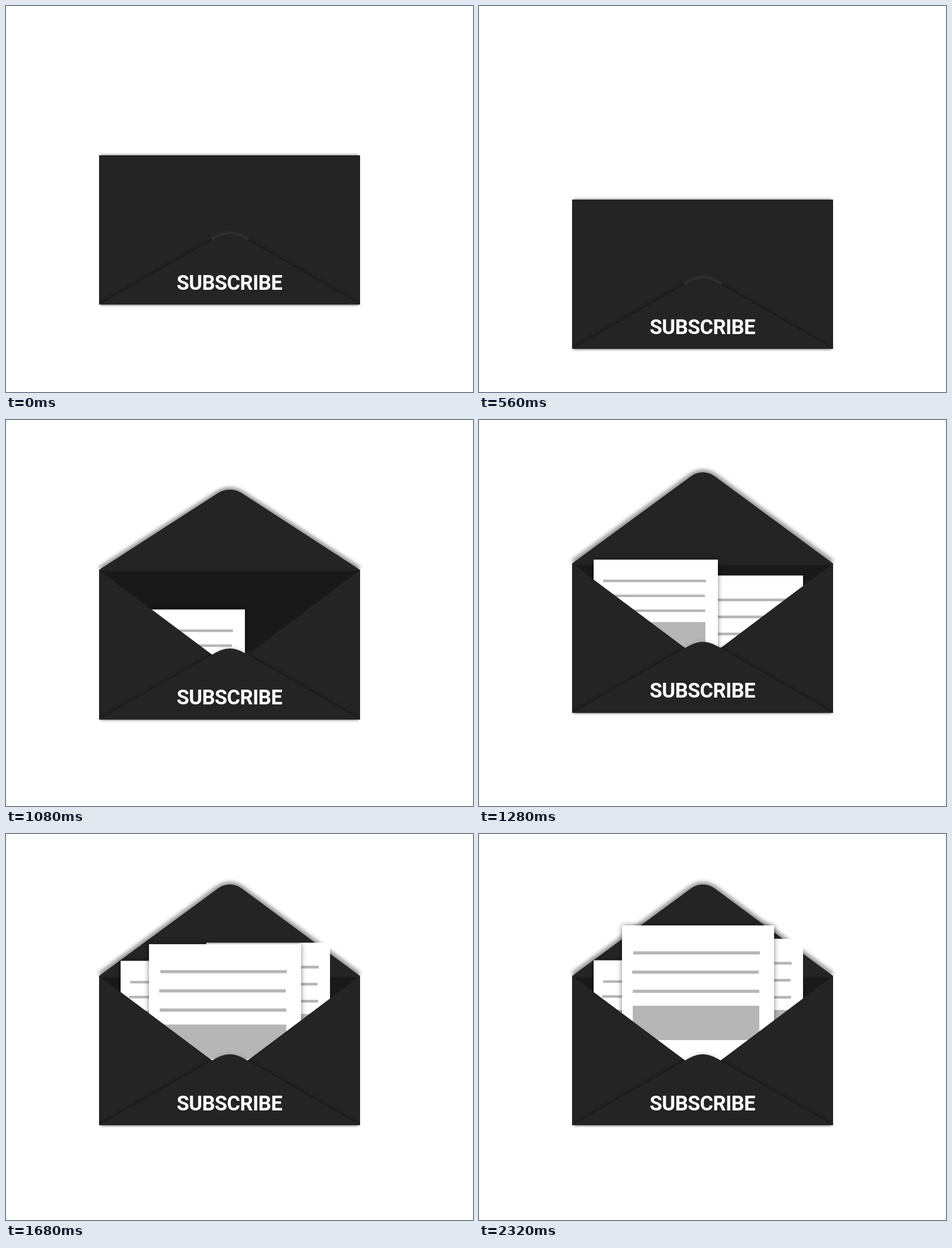
These frames come from a looping animation (823 by 680 pixels, 2960 ms). An HTML page:

```html
<!DOCTYPE html>
<html lang="en">
<head>
<meta charset="utf-8">
<title>Subscribe envelope</title>
<style>
  html, body { margin: 0; width: 100%; height: 100%; overflow: hidden; background: #fff; }
  svg { display: block; width: 100%; height: 100%; }
  .cover { fill: #242424; }
  .edge { fill: none; stroke: #000; }
  .ink { fill: #b6b6b6; }
  .label { font: 700 36px Roboto, Arial, sans-serif; letter-spacing: -.6px; fill: #fff; text-anchor: middle; }
</style>
</head>
<body>
<svg viewBox="0 0 823 680">
  <defs>
    <clipPath id="inside"><rect x="0" y="-300" width="823" height="550"/></clipPath>
    <path id="sides" d="M164 0L364 149.5H425L624 0V263H164Z"/>
    <clipPath id="sideArea"><use href="#sides"/></clipPath>
    <path id="pocket" d="M164 263L364 148.5C376 141.5 385 138 394.5 138S413 141.5 425 148.5L624 263Z"/>
  </defs>
  <g id="envelope">
    <path class="edge" d="M167 263.5H621" stroke-width="3" opacity=".3" style="filter:blur(1px)"/>
    <path id="topShade" class="edge" d="M167 -.5H621" stroke-width="4" opacity=".25" style="filter:blur(1.5px)"/>
    <rect x="164" width="460" height="263" fill="#191919"/>
    <g id="flap">
      <path id="flapShade" class="edge" d="M166 -2L372 -153C380 -159 387 -161 394.5 -161S409 -159 417 -153L622 -2"
        stroke-width="9" opacity=".45" style="filter:blur(3.5px)"/>
      <path class="cover" d="M164 0L372 -153C380 -159 387 -161 394.5 -161S409 -159 417 -153L624 0V2.5H164Z"/>
    </g>
    <g id="papers" clip-path="url(#inside)"></g>
    <use href="#pocket" fill="#777" opacity=".5" style="filter:blur(3px)"/>
    <use href="#sides" class="cover"/>
    <g clip-path="url(#sideArea)">
      <use href="#pocket" opacity=".65" style="filter:blur(3.5px)"/>
    </g>
    <use href="#pocket" class="cover"/>
    <text class="label" x="393.7" y="236.8">SUBSCRIBE</text>
  </g>
</svg>
<script>
const LOOP = 2960, STEP = 40, LAST = 2320, TURN = 640;
const NS = 'http://www.w3.org/2000/svg';
const $ = id => document.getElementById(id);

function add(parent, tag, attrs) {
  const el = document.createElementNS(NS, tag);
  for (const key in attrs) el.setAttribute(key, attrs[key]);
  return parent.appendChild(el);
}

// Each sheet settles at `rest`; `gap` is the distance left at 1280 ms.
const sheets = [
  { x: 353, w: 218, inset: 16, len: 181, bar: 4.8, rows: [43, 73, 103], block: [125.5, 54],
    rest: -65.5, gap: 86.8, tau: 159, shade: 0 },
  { x: 202, w: 219, inset: 16, len: 181, bar: 4.5, rows: [37.5, 63.8, 90], block: [110, 49],
    rest: -27.5, gap: 20.8, tau: 130, shade: 4 },
  { x: 252, w: 268, inset: 19, len: 223, bar: 5.6, rows: [48.4, 82.3, 116], block: [141.5, 60.5],
    rest: -90, gap: 300, tau: 184, shade: 5 }
];

for (const s of sheets) {
  s.el = add($('papers'), 'g', {});
  const page = add(s.el, 'rect', { x: s.x, width: s.w, height: 420, fill: '#fff' });
  if (s.shade) page.style.filter = `drop-shadow(0 0 ${s.shade}px rgba(0,0,0,.5))`;
  const left = s.x + s.inset;
  [1, -1, 0].forEach((shift, i) => add(s.el, 'rect', {
    class: 'ink', x: left + shift, y: s.rows[i] - s.bar / 2, width: s.len, height: s.bar
  }));
  add(s.el, 'rect', { class: 'ink', x: left, y: s.block[0], width: s.len, height: s.block[1] });
}

const easeOut = (t, start, span, power) =>
  1 - Math.pow(1 - Math.min(1, Math.max(0, (t - start) / span)), power);

const move = (el, y) => el.setAttribute('transform', `translate(0 ${y.toFixed(2)})`);

function draw(t) {
  const y = t < TURN
    ? 263 + 124.5 * Math.pow(t / TURN, 3.5)
    : 387.5 - 137.5 * easeOut(t, TURN, 1020, 4);
  move($('envelope'), y);

  // -1 is folded down, 1 is fully open; the hinge shifts a little as it turns.
  const open = 2 * easeOut(t, TURN, 728, 3) - 1;
  const lift = open > 0 ? -4 * (1 - open) : -2.5 * open;
  $('flap').setAttribute('transform', `translate(0 ${lift.toFixed(2)}) scale(1 ${open.toFixed(4)})`);
  $('flapShade').style.visibility = open > 0 ? 'visible' : 'hidden';
  $('topShade').style.visibility = open > 0 ? 'hidden' : 'visible';

  for (const s of sheets) {
    const left = s.gap * Math.exp((1280 - t) / s.tau);
    move(s.el, Math.min(300, s.rest + left));
  }
}

const begin = performance.now();
function tick() {
  const t = (performance.now() - begin) % LOOP;
  draw(Math.min(LAST, Math.floor(t / STEP) * STEP));
  requestAnimationFrame(tick);
}
tick();
</script>
</body>
</html>
```
